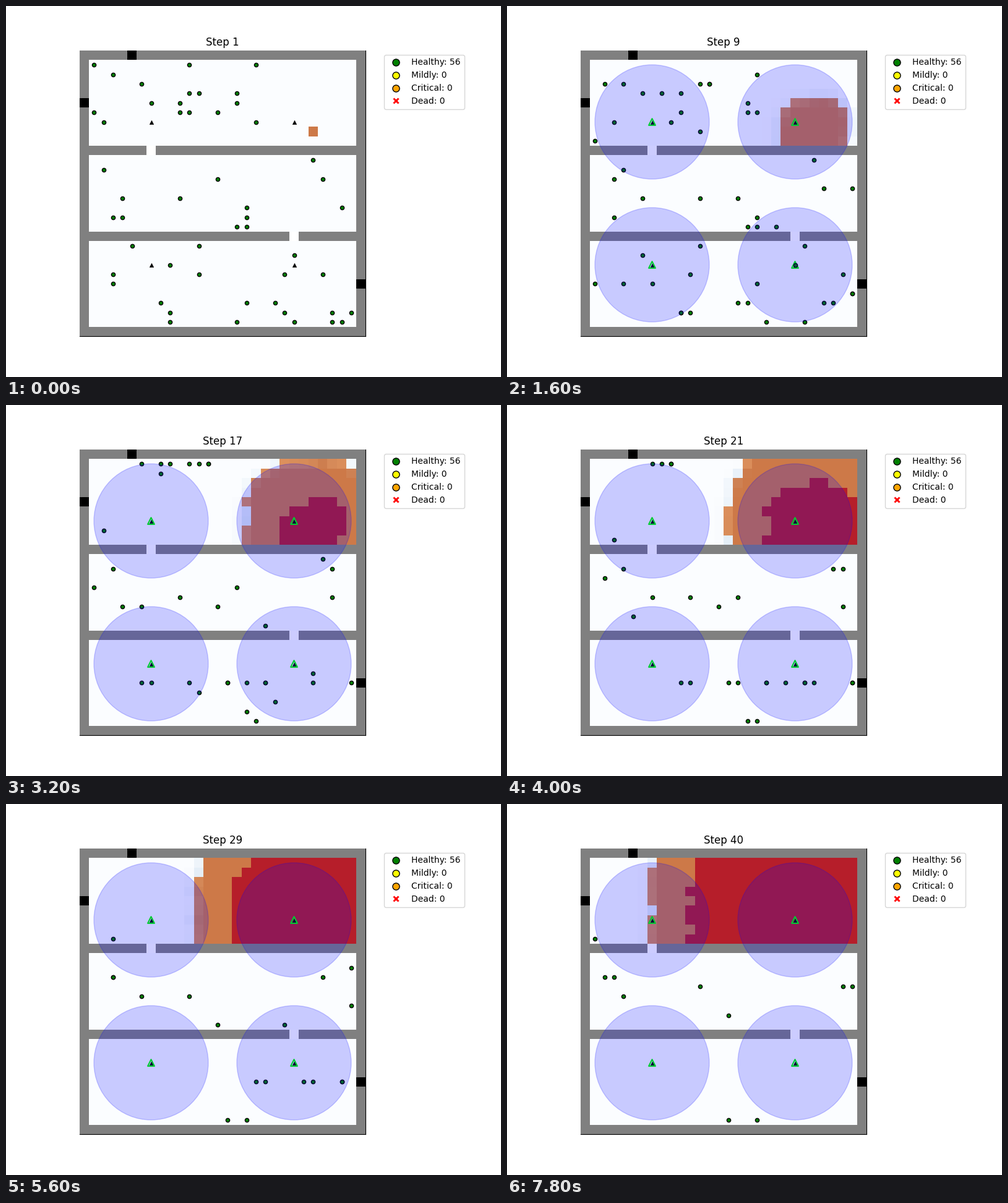
A matplotlib script that plays this animation: 800x600 px, repeating every 8 s.

```python
import matplotlib.pyplot as plt
import numpy as np
from matplotlib.animation import FuncAnimation
from matplotlib.lines import Line2D
from matplotlib.patches import Circle

SIZE, STEPS, ALARM_STEP, BURN_TIME = 30, 40, 8, 9
SPRINKLERS = [(7, 7), (22, 7), (7, 22), (22, 22)]
FIRE_START, FIRE_SPEED = (24, 8), 0.435
rng = np.random.default_rng(4)

# ---- crowd: some wander to the end, the rest walk out one by one ----
crowd = [[] for _ in range(STEPS)]


def wander(home, rows, n):
    """Random walk of n steps that stays near home."""
    home = np.array(home)
    low = np.maximum(home - 2, (1, rows[0]))
    high = np.minimum(home + 2, (28, rows[1]))
    path = [home]
    while len(path) < n:
        move = rng.integers(-1, 2, 2) * (rng.random() < 0.6)
        path.append(np.clip(path[-1] + move, low, high))
    return path


def walk_out(spot, door, rows):
    path = []
    while np.abs(door - spot).max() > 1:
        spot = np.clip(spot + np.sign(door - spot), (1, rows[0]), (28, rows[1]))
        path.append(spot)
    return path


def fill_room(rows, max_col, doors, leavers, first, last, stayers):
    def way(p):
        return min((np.array(d) for d in doors),
                   key=lambda d: np.abs(d - p).max())

    def far(p):
        return np.abs(way(p) - p).max()

    paths = [wander(p, rows, STEPS)[::-1] for p in stayers]
    homes = rng.integers((1, rows[0]), (max_col + 1, rows[1] + 1), (leavers, 2))
    for home, leave in zip(sorted(homes, key=far),
                           np.linspace(first, last, leavers)):
        path = wander(home, rows, int(leave) - far(home))
        paths.append(path + walk_out(path[-1], way(path[-1]), rows))
    for path in paths:
        for spots, p in zip(crowd, path):
            spots.append(p)


fill_room((1, 9), 18, [(5, 0), (0, 5)], 16, 10, 25, [(1, 9)])
fill_room((11, 18), 26, [(7, 10), (22, 19)], 6, 12, 36,
          [(2, 13), (3, 13), (4, 15), (12, 14), (15, 17), (27, 14), (28, 14)])
fill_room((20, 28), 28, [(29, 24)], 19, 10, 40, [(15, 28), (18, 28)])

# ---- fire: a ragged, rounded front growing at constant speed ----
row, col = np.mgrid[:SIZE, :SIZE]
reach = (abs(col - FIRE_START[0]) ** 3.0 + abs(row - FIRE_START[1]) ** 3.0) ** (1 / 3)
ragged = rng.uniform(-0.8, 0.8, reach.shape) * (reach > 0)
ignite = np.rint(1 + reach / FIRE_SPEED + ragged)
top_room = (row > 0) & (row < 10) & (col > 0) & (col < 29)
ignite[~top_room] = STEPS + 1

# ---- smoke and floor pictures ----
blues = plt.get_cmap("Blues")
FLAME, EMBER = np.array([1, 0.4, 0]), np.array([182, 30, 42]) / 255


def spread(smoke):
    pad = np.pad(smoke, 1, mode="edge")
    mean = (pad[:-2, 1:-1] + pad[2:, 1:-1]
            + pad[1:-1, :-2] + pad[1:-1, 2:]) / 4
    return 0.4 * smoke + 0.6 * mean


def draw_floor(step, smoke):
    img = 0.5 + 0.5 * blues(smoke)[..., :3]
    burning = ignite <= step
    img[burning] = 0.6 * FLAME + 0.4 * img[burning]
    img[ignite <= step - BURN_TIME] = EMBER
    img[[0, 10, 19, 29]] = 128 / 255
    img[:, [0, 29]] = 128 / 255
    img[10, 7] = img[19, 22] = 1
    img[0, 5] = img[5, 0] = img[24, 29] = 0
    return img


floors = []
smoke = np.zeros((SIZE, SIZE))
for step in range(1, STEPS + 1):
    smoke[1:10, 1:29] = spread(smoke[1:10, 1:29])
    smoke[ignite <= step] += 1 if step == 1 else 0.4
    smoke = np.minimum(smoke, 1)
    floors.append(draw_floor(step, smoke))

# ---- stage ----
fig, ax = plt.subplots(figsize=(8, 6), dpi=100)
fig.subplots_adjust(left=0.125, right=0.75, bottom=0.11, top=0.88)
ax.set_xticks([])
ax.set_yticks([])
ax.spines[["left", "top"]].set_visible(False)
picture = ax.imshow(floors[0], interpolation="nearest")
title = ax.set_title("Step 1")
sx, sy = zip(*SPRINKLERS)
ax.scatter(sx, sy, s=20, c="black", marker="^", linewidths=0.5, zorder=2)
rings = ax.scatter(sx, sy, s=60, facecolors="none", edgecolors="lime",
                   marker="^", linewidths=1.5, zorder=2)
dots = ax.scatter([], [], s=20, c="green", edgecolors="black", linewidths=1,
                  zorder=3)
sprays = [ax.add_patch(Circle(p, 6, color="blue", alpha=0.2, zorder=5))
          for p in SPRINKLERS]


def entry(label, color, marker="o", edge="black"):
    return Line2D([0], [0], marker=marker, color="w", label=label,
                  markerfacecolor=color, markeredgecolor=edge, markersize=8)


ax.legend(handles=[entry("Healthy: 56", "green"), entry("Mildly: 0", "yellow"),
                   entry("Critical: 0", "orange"),
                   entry("Dead: 0", "red", "X", "white")],
          loc="upper left", bbox_to_anchor=(1.05, 1), fontsize=10)


def update(i):
    step = i + 1
    picture.set_data(floors[i])
    title.set_text(f"Step {step}")
    dots.set_offsets(np.array(crowd[i], dtype=float))
    for item in [rings, *sprays]:
        item.set_visible(step >= ALARM_STEP)
    return [picture, title, dots, rings, *sprays]


anim = FuncAnimation(fig, update, frames=STEPS, interval=200, repeat=True,
                     repeat_delay=0, blit=False)
plt.show()
```
